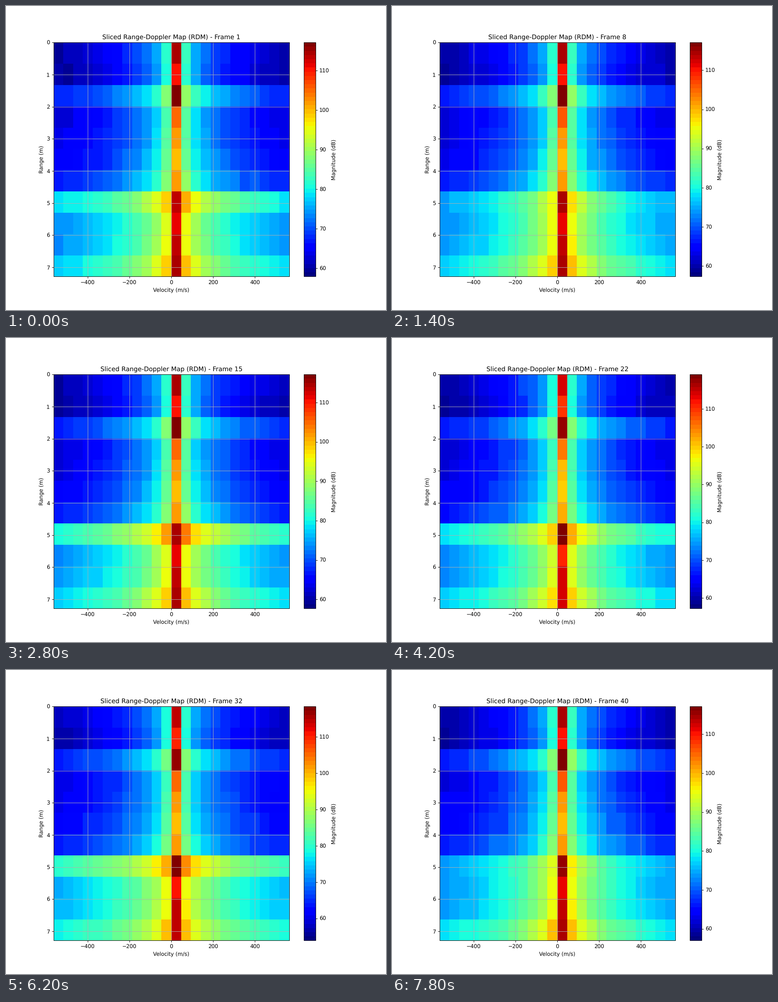
Recreate the animation shown at these times as a matplotlib script. Size 837 by 669 pixels, loop 8000 ms.

```python
import numpy as np
import matplotlib.pyplot as plt
from matplotlib.animation import FuncAnimation

plt.rcParams["font.family"] = "DejaVu Sans"
plt.rcParams["text.hinting"] = "none"

DPI = 83.7
FRAMES, STEP_MS = 40, 200
ROWS, COLS, MID = 11, 24, 12
TARGET = 7          # range bin of the fluctuating reflector
FLOOR_MEAN = 57.3   # dB
DROP = 21.7         # dB from beside the peak to the outermost column

# Steady level of each range bin in dB: at zero velocity and right beside it
PEAK = np.array([114, 110.2, 117.1, 105.4, 101.3, 99.3, 101.8, 113, 111.3, 113.8, 114.3])
SIDE = np.array([81.6, 80.8, 88.4, 83.9, 84.4, 85.6, 87.9, 99, 95, 95.5, 99.2])

# Key points of the noise floor and of the reflector's two levels
KEYS = [0, 7, 14, 21, 26, 31, 39]
FLOOR = [57.9, 57.3, 57.7, 57.2, 60.5, 53.9, 57]
TARGET_PEAK = [112.9, 114.1, 114.1, 119.1, 119.7, 118.4, 115.8]
TARGET_SIDE = [99.9, 96.2, 102.6, 101.1, 106.1, 102, 95.4]

rows = np.arange(ROWS)[:, None]
near = rows < TARGET
offset = np.arange(COLS) - MID
dist = np.maximum(np.abs(offset), 1)

# Leakage falls with the logarithm of the distance from zero velocity
fall = np.log((dist + 0.5) / 1.5) / np.log((MID + 0.5) / 1.5)
fall = fall ** np.where(near, 0.85, 1)
grain = np.where(near, 0.4, 0.2) * fall
tilt = np.where(rows == TARGET, 1.3, 0.3) * np.sign(offset) / dist


def range_doppler(i):
    floor, peak_t, side_t = (np.interp(i, KEYS, v)
                             for v in (FLOOR, TARGET_PEAK, TARGET_SIDE))
    peak, side = PEAK.copy(), SIDE.copy()
    peak[TARGET], side[TARGET] = peak_t, side_t
    side[:TARGET] += 0.7 * (floor - FLOOR_MEAN)

    rng = np.random.default_rng(100 + i)
    level = side[:, None] - DROP * fall + tilt + grain * rng.normal(size=(ROWS, COLS))
    level[:, MID] = peak
    return level, floor


fig, ax = plt.subplots(figsize=(837.01 / DPI, 669.01 / DPI), dpi=DPI)
mesh = ax.pcolormesh(np.linspace(-563.5, 563.5, COLS + 1), np.linspace(0, 7.288, ROWS + 1),
                     np.zeros((ROWS, COLS)), cmap=plt.get_cmap("jet", 56))
fig.colorbar(mesh, ax=ax, label="Magnitude (dB)")
ax.invert_yaxis()
ax.set_xlabel("Velocity (m/s)")
ax.set_ylabel("Range (m)")
ax.grid(True)
title = ax.set_title("")


def update(i):
    level, floor = range_doppler(i)
    mesh.set_array(level)
    mesh.set_clim(floor, level.max())
    title.set_text(f"Sliced Range-Doppler Map (RDM) - Frame {i + 1}")
    return mesh, title


anim = FuncAnimation(fig, update, frames=FRAMES, interval=STEP_MS,
                     init_func=lambda: update(0), repeat=True, repeat_delay=0)
plt.show()
```
